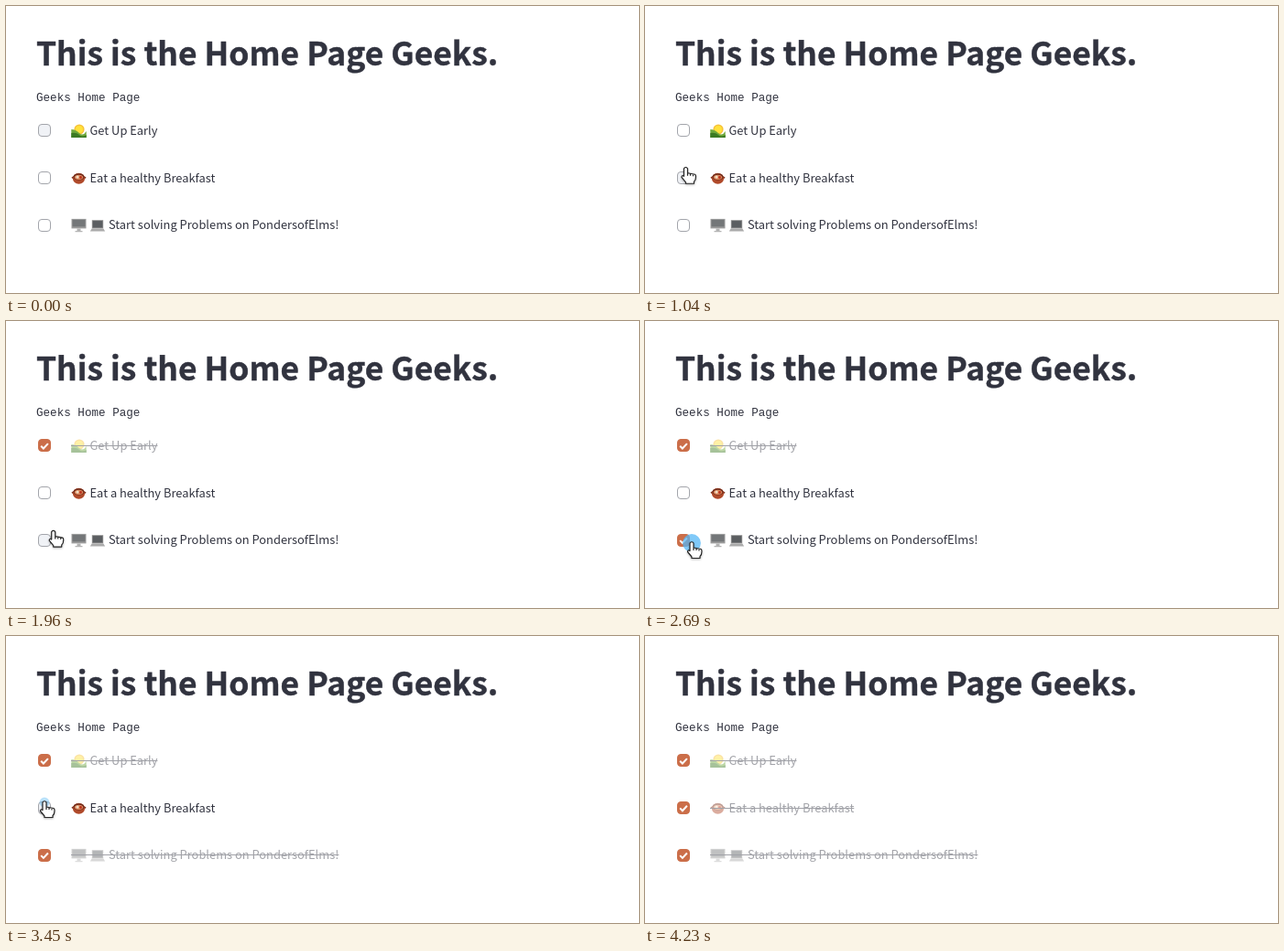
Animation, 691 px wide and 314 px high, one loop 5390 ms. Source, as an HTML page:

```html
<!DOCTYPE html>
<html lang="en">
<head>
<meta charset="utf-8">
<title>Morning checklist</title>
<style>
html, body { margin: 0; width: 100%; height: 100%; overflow: hidden; background: #fff; }
svg { display: block; }
text { fill: #31333f; font: 12.88px "Noto Sans CJK JP", "Noto Sans CJK SC", "Noto Sans CJK", "Noto Sans", sans-serif; white-space: pre; }
.title { font-size: 35.4px; font-weight: 700; stroke: #31333f; stroke-width: .4; }
.code { font: 12.6px "Liberation Mono", monospace; }
.box { stroke: #a3a5ab; fill: #fff; }
.hover .box { fill: #f0f2f6; }
.checked .box { fill: #cb6e49; stroke: #cb6e49; }
.tick { fill: none; stroke: #fff; stroke-width: 2; visibility: hidden; }
.checked .tick { visibility: visible; }
.strike { stroke: #31333f; visibility: hidden; }
.done .label { opacity: .45; }
.done .strike { visibility: visible; }
#cursor { filter: drop-shadow(.7px 1px .8px rgba(0, 0, 0, .3)); }
</style>
</head>
<body>
<svg width="691" height="314" viewBox="0 0 691 314">
  <defs>
    <g id="sunrise">
      <circle cx="9" cy="6" r="5.6" fill="#f7c23a"/>
      <circle cx="9" cy="6" r="4" fill="#ffe23c"/>
      <path fill="#6fa83a" d="M.3 6Q5 6 9 10T16.7 8V15H.3Z"/>
      <path fill="#3b7a22" d="M.3 10Q6 9 9 12T16.7 12V15H.3Z"/>
    </g>
    <g id="stew">
      <ellipse cx="8.5" cy="7" rx="8" ry="2.2" fill="#7d3521"/>
      <ellipse cx="8.5" cy="8" rx="6.6" ry="6" fill="#b04a2a"/>
      <ellipse cx="8.5" cy="6.2" rx="6" ry="3.6" fill="#6f2d1d"/>
      <ellipse cx="8.5" cy="6.6" rx="4.6" ry="2.6" fill="#dd8a5c"/>
      <circle cx="7" cy="6.4" r="1.6" fill="#f0dcc4"/>
      <circle cx="10.5" cy="6.8" r="1.4" fill="#b9301f"/>
    </g>
    <g id="desktop">
      <path fill="#9b9b9b" d="M.5 .5H16.5V11H.5Z"/>
      <path fill="#747779" d="M1.5 1.5H15.5V9H1.5Z"/>
      <path fill="#b4b4b4" d="M6.5 11H10.5V13.5H12.5V14.8H4.5V13.5H6.5Z"/>
    </g>
    <g id="laptop">
      <path fill="#8d8d8d" d="M2.3 1.8H14.7V11H2.3Z"/>
      <path fill="#5b5e61" d="M3.2 2.7H13.8V10H3.2Z"/>
      <path fill="#aaa" d="M2.2 11H14.8L16.7 14H.3Z"/>
    </g>
  </defs>
  <text class="title" x="33" y="65.2">This is the Home Page Geeks.</text>
  <text class="code" x="33" y="104">Geeks Home Page</text>
  <g id="rows"></g>
  <circle id="pulse" fill="none" stroke="#54b6f6"/>
  <g id="cursor">
    <path id="arrow" fill="#2c2c2c" stroke="#fff" d="M0 0V16L4 12.5 7 19 9.7 17.7 7 11.5H12Z"/>
    <path id="hand" fill="#fff" stroke="#252525" stroke-width="1.2" stroke-linejoin="round"
      d="M-3 0Q-1-2.5 1 0V5L9 6.5Q10 7 10 9 10 13 8 14.5V16.5H-1V15L-5.5 9.5Q-5.5 7-3 8.5ZM1 4.5V8M4 5.5V8M7 6V8.5"/>
  </g>
</svg>
<script>
const LOOP = 5390;
const SHOWN = { from: 380, to: 4230 };
const PULSE = 320, CHECK_DELAY = 40, STRIKE_DELAY = 140;
const ICON_STEP = 20.5, LABEL_X = 71;
const $ = id => document.getElementById(id);

const tasks = [
  { icons: ["sunrise"], text: "Get Up Early", click: { t: 1440, x: 44, y: 129 } },
  { icons: ["stew"], text: "Eat a healthy Breakfast", click: { t: 3450, x: 42, y: 182 } },
  { icons: ["desktop", "laptop"], text: "Start solving Problems on PondersofElms!", click: { t: 2570, x: 51, y: 243 } }
];

const home = { x: 45, y: 131 };
const moves = [
  { from: 380, to: 620, x: 53, y: 184 },
  { from: 620, to: 890, x: 45.5, y: 178 },
  { from: 1040, to: 1240, x: 44, y: 129 },
  { from: 1480, to: 2020, x: 55, y: 243 },
  { from: 2230, to: 2270, x: 52, y: 243 },
  { from: 2730, to: 3050, x: 43, y: 182 },
  { from: 4000, to: 4230, x: 8, y: 204 }
];

const clamp01 = v => Math.min(1, Math.max(0, v));

function setAttrs(el, attrs) {
  for (const name in attrs) el.setAttribute(name, attrs[name]);
}

function show(id, visible) {
  $(id).style.display = visible ? "" : "none";
}

tasks.forEach((task, row) => {
  const y = task.y = 136.4 + row * 51.7;
  const textX = LABEL_X + task.icons.length * ICON_STEP;
  const icons = task.icons.map((id, i) =>
    `<use href="#${id}" x="${LABEL_X + i * ICON_STEP}" y="${y - 7.4}"/>`).join("");
  $("rows").insertAdjacentHTML("beforeend", `<g>
    <rect class="box" x="35.5" y="${Math.round(y - 7) + .5}" width="13" height="13" rx="3.5"/>
    <path class="tick" d="M38.2 ${y + .3}l2.7 2.8 5-5.4"/>
    <g class="label">${icons}<text x="${textX}" y="${y + 4.6}">${task.text}</text>
      <path class="strike"/></g></g>`);
  task.el = $("rows").lastElementChild;
  const end = textX + task.el.querySelector("text").getComputedTextLength();
  setAttrs(task.el.querySelector(".strike"), { d: `M${LABEL_X} ${Math.floor(y) + .5}H${end}` });
});

// Each move bends: y runs evenly while x speeds up.
function cursorAt(t) {
  return moves.reduce((pos, { from, to, x, y }) => {
    const p = clamp01((t - from) / (to - from));
    return { x: pos.x + (x - pos.x) * p * p, y: pos.y + (y - pos.y) * p };
  }, home);
}

// A disc grows, then a hole opens and eats it from inside.
function drawPulse(t) {
  const task = tasks.find(({ click }) => t >= click.t && t < click.t + PULSE);
  show("pulse", task);
  if (!task) return;
  const { t: begin, x, y } = task.click;
  const p = (t - begin) / PULSE;
  const outer = 5 + 8 * Math.sqrt(p);
  const inner = 13 * clamp01((p - .38) / .62) ** .35;
  setAttrs($("pulse"), {
    cx: x, cy: y, r: (outer + inner) / 2,
    "stroke-width": Math.max(0, outer - inner),
    opacity: Math.min(.8, .4 + .9 * p)
  });
}

function draw(t) {
  const { x, y } = cursorAt(t);
  const isOver = task => x > 28 && Math.abs(y - task.y) < 10.5;
  const pointing = tasks.some(isOver);
  for (const task of tasks) {
    const { el, click } = task;
    el.classList.toggle("hover", isOver(task));
    el.classList.toggle("checked", t >= click.t + CHECK_DELAY);
    el.classList.toggle("done", t >= click.t + STRIKE_DELAY);
  }
  drawPulse(t);
  show("cursor", t >= SHOWN.from && t < SHOWN.to);
  setAttrs($("cursor"), { transform: `translate(${x} ${y})` });
  show("hand", pointing);
  show("arrow", !pointing);
}

const start = performance.now();
function tick() {
  draw((performance.now() - start) % LOOP);
  requestAnimationFrame(tick);
}
tick();
</script>
</body>
</html>
```
